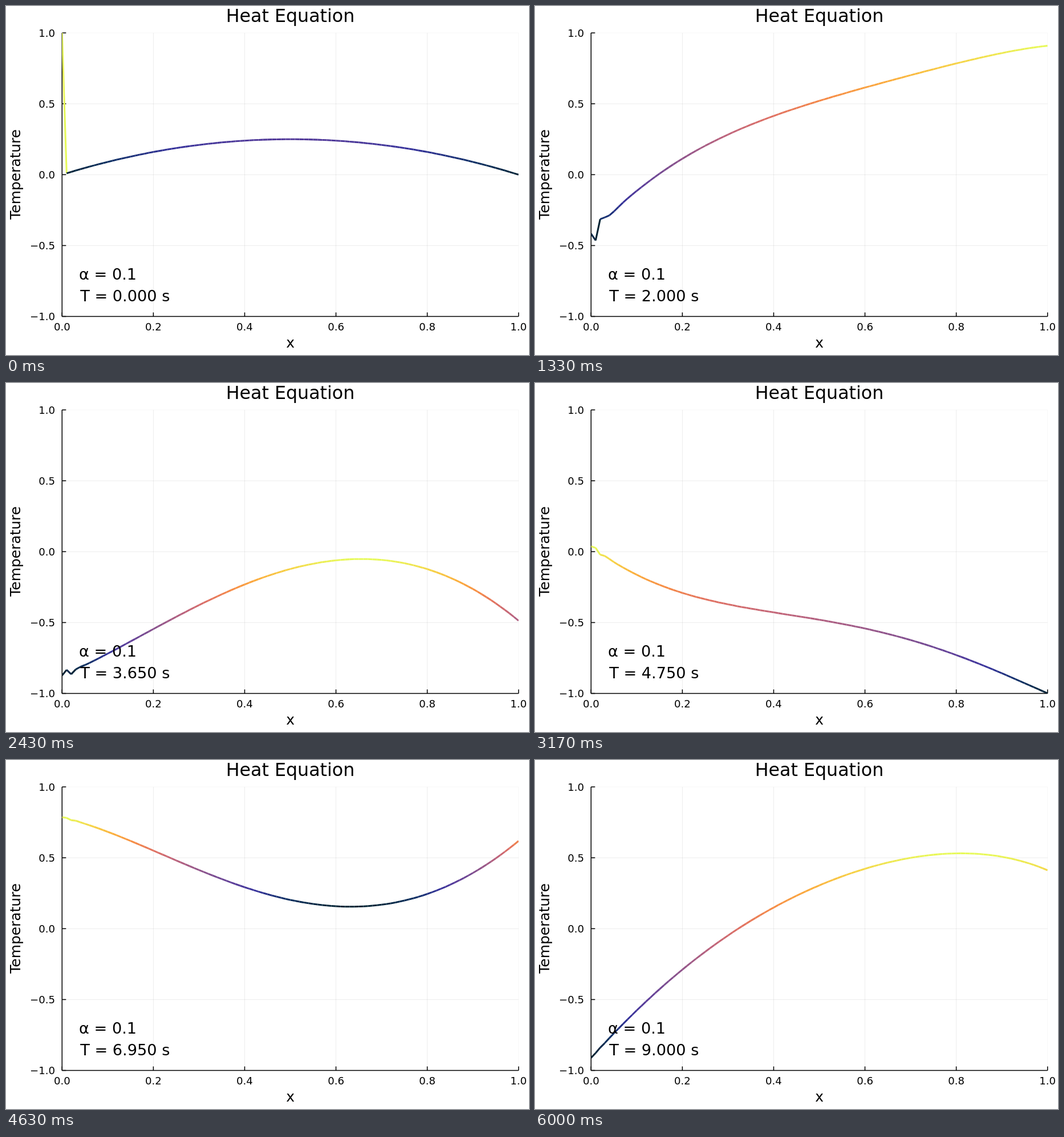
Recreate the animation shown at these times as an HTML page. Size 917x611 px, loop 6030 ms.

```html
<!DOCTYPE html>
<html lang="en">
<head>
<meta charset="utf-8">
<title>Heat Equation</title>
<style>
  html, body { margin: 0; width: 100%; height: 100%; overflow: hidden; background: #fff; }
  svg { display: block; width: 917px; height: 611px; }
  text { font-family: "DejaVu Sans", sans-serif; fill: #000; white-space: pre; }
  .title { font-size: 31.7px; text-anchor: middle; }
  .guide { font-size: 24.9px; text-anchor: middle; }
  .note { font-size: 27.17px; }
  .tick { font-size: 18.1px; }
  .grid line { stroke: #000; stroke-opacity: .1; stroke-width: .76; }
  .grid .edge { stroke-opacity: .05; }
  .axes line { stroke: #000; stroke-width: 1.53; }
  #curve line { stroke-width: 3.06; }
</style>
</head>
<body>
<svg viewBox="0 0 917 611">
  <clipPath id="area"><rect x="98.3" y="47" width="800.5" height="496.6"/></clipPath>
  <g class="grid" id="grid"></g>
  <g class="axes" id="axes"></g>
  <g id="labels"></g>
  <text class="title" x="498.5" y="27.8">Heat Equation</text>
  <text class="guide" x="498.5" y="598">x</text>
  <text class="guide" transform="translate(25 294.8) rotate(-90)">Temperature</text>
  <g id="curve" clip-path="url(#area)"></g>
  <text class="note" x="128" y="479">α = 0.1</text>
  <text class="note" x="130.2" y="516.5" id="clock">T = 0.000 s</text>
</svg>
<script>
const CELLS = 100, STEPS = 180, DT = 0.05, ALPHA = 0.1, LOOP = 6030;
const THERMAL = [
  [3, 35, 51], [13, 48, 100], [53, 50, 155], [93, 62, 153],
  [126, 77, 143], [158, 89, 135], [193, 100, 121], [225, 113, 97],
  [246, 139, 69], [251, 173, 60], [246, 211, 70], [231, 250, 90]
];
const px = x => 98.3 + 800.4 * x;
const py = u => 295.3 - 248.2 * u;
const $ = id => document.getElementById(id);

function add(parent, tag, attrs, text = "") {
  const el = document.createElementNS("http://www.w3.org/2000/svg", tag);
  for (const name in attrs) el.setAttribute(name, attrs[name]);
  el.textContent = text;
  return parent.appendChild(el);
}
const line = (parent, x1, y1, x2, y2, cls = "") =>
  add(parent, "line", { x1, y1, x2, y2, class: cls });

function drawAxes() {
  const [left, right, top, bottom] = [px(0), px(1), py(1), py(-1)];
  for (let i = 0; i <= 5; i++) {
    const x = px(i / 5);
    if (i) line($("grid"), x, top, x, bottom, i === 5 ? "edge" : "");
    line($("axes"), x, bottom, x, bottom - 7);
    add($("labels"), "text", { class: "tick", x, y: 567.6, "text-anchor": "middle" }, (i / 5).toFixed(1));
  }
  for (let i = -2; i <= 2; i++) {
    const y = py(i / 2);
    if (i > -2) line($("grid"), left, y, right, y, i === 2 ? "edge" : "");
    line($("axes"), left, y, left + 7, y);
    add($("labels"), "text", { class: "tick", x: 86, y: y + 6.6, "text-anchor": "end" },
      (i / 2).toFixed(1).replace("-", "−"));
  }
  line($("axes"), left, top, left, bottom);
  line($("axes"), left, bottom, right, bottom);
}

// One Crank–Nicolson step; the ends follow cos(t) and sin(t).
function advance(u, t) {
  const h = ALPHA * DT * CELLS * CELLS / 2;
  const next = new Array(CELLS + 1), c = [0], d = [Math.cos(t)];
  for (let j = 1; j < CELLS; j++) {
    const rhs = u[j] + h * (u[j - 1] - 2 * u[j] + u[j + 1]);
    const m = 1 + 2 * h + h * c[j - 1];
    c[j] = -h / m;
    d[j] = (rhs + h * d[j - 1]) / m;
  }
  next[CELLS] = Math.sin(t);
  for (let j = CELLS - 1; j >= 0; j--) next[j] = d[j] - c[j] * next[j + 1];
  return next;
}

function solve() {
  const first = Array.from({ length: CELLS + 1 }, (_, j) => j / CELLS * (1 - j / CELLS));
  first[0] = 1;
  const states = [first];
  for (let n = 1; n <= STEPS; n++) states.push(advance(states[n - 1], n * DT));
  return states;
}

function thermal(v) {
  const p = v * (THERMAL.length - 1);
  const i = Math.min(Math.floor(p), THERMAL.length - 2);
  const rgb = THERMAL[i].map((a, k) => Math.round(a + (THERMAL[i + 1][k] - a) * (p - i)));
  return `rgb(${rgb})`;
}

drawAxes();
const states = solve();
const segments = Array.from({ length: CELLS }, (_, j) =>
  line($("curve"), px(j / CELLS), 0, px((j + 1) / CELLS), 0));
let shown = -1;

function draw(step) {
  const u = states[step], low = Math.min(...u), high = Math.max(...u);
  segments.forEach((seg, j) => {
    seg.setAttribute("y1", py(u[j]));
    seg.setAttribute("y2", py(u[j + 1]));
    seg.setAttribute("stroke", thermal((u[j] - low) / (high - low)));
  });
  $("clock").textContent = `T = ${(step * DT).toFixed(3)} s`;
}

// 30 steps a second, each change rounded to 10 ms.
function tick() {
  const ticks = Math.floor(performance.now() % LOOP / 10);
  const step = Math.min(STEPS, Math.floor((ticks + 0.5) * 0.3));
  if (step !== shown) draw(shown = step);
  requestAnimationFrame(tick);
}
tick();
</script>
</body>
</html>
```
